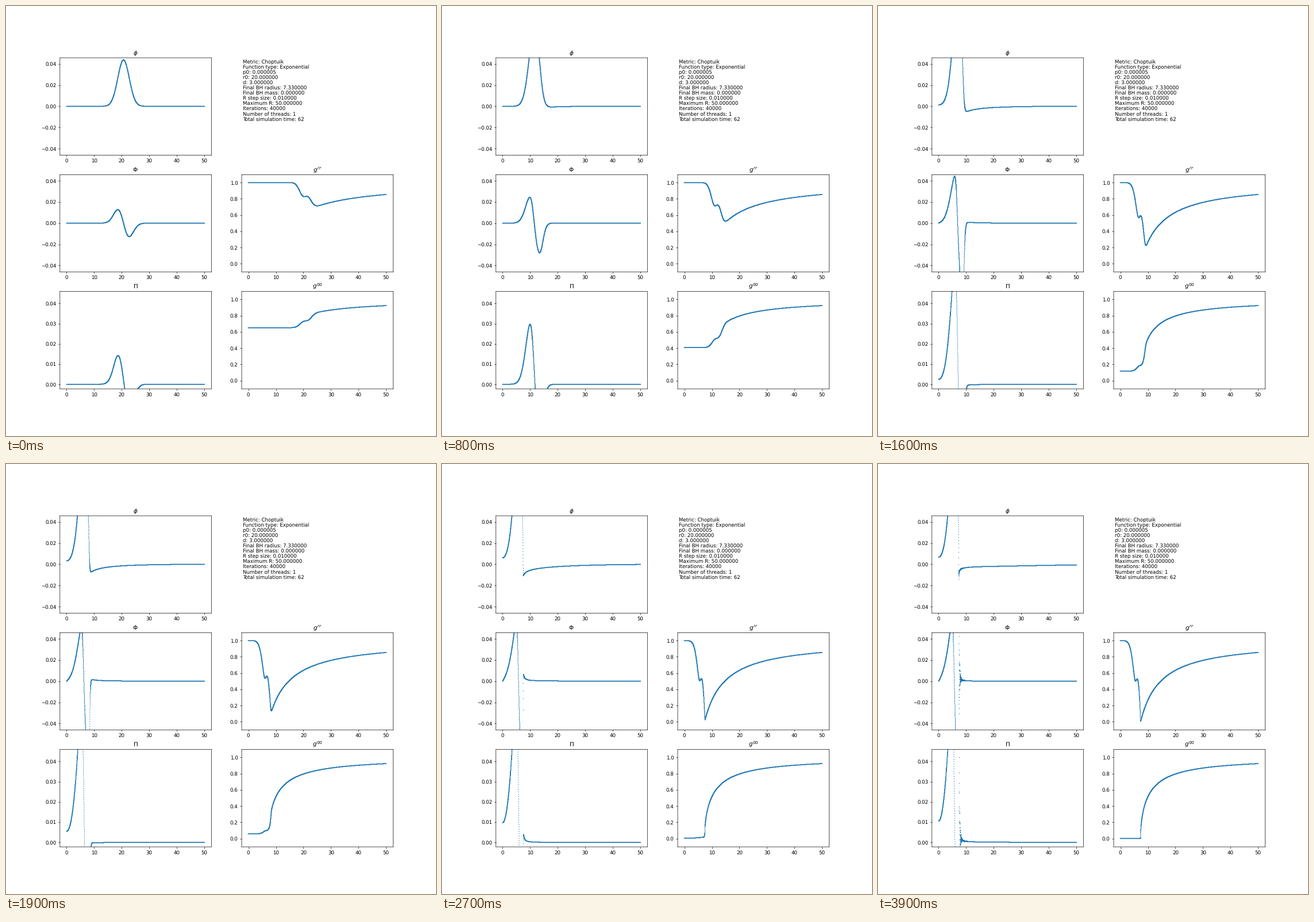
Animation of 748 by 748 pixels, one loop 4000 ms. Source, as a matplotlib script:

```python
import numpy as np
import matplotlib.pyplot as plt
from matplotlib import patheffects
from matplotlib.animation import FuncAnimation

# Spherical collapse of a massless scalar field in polar-areal slicing:
# Phi = phi', Pi = (a / alpha) dphi/dt, evolved with RK4.

SIZE, INCHES = 748, 12
DPI = SIZE / INCHES
GRID = 100 / DPI                 # points sit on a 100 dpi grid
FRAMES, INTERVAL = 40, 100
STEPS = 125                      # time steps per frame
DT = 2 / STEPS
R_MAX, DR = 50, 0.01
R0, WIDTH, HORIZON = 20, 3, 7.326

plt.rcParams["font.family"] = "DejaVu Sans"
plt.rcParams["text.hinting"] = "none"
plt.rcParams["path.simplify"] = False

r = np.linspace(0, R_MAX, 5001)
r2 = r ** 2
r3 = r ** 3
shell = 3 / (r3[2:] - r3[:-2])


def geometry(Phi, Pi):
    """Solve the constraints: light speed alpha/a and the product alpha*a."""
    q = 4 * np.pi * r * (Phi * Phi + Pi * Pi)
    Q = DR * (np.cumsum(q) - q / 2)
    prod = np.exp(Q - Q[-1])
    speed = DR * (np.cumsum(prod) - (prod + prod[0]) / 2)
    speed[1:] /= r[1:]
    speed[0] = prod[0]
    return speed, prod


def pulse(p):
    """Ingoing pulse phi = p r^3 exp(-((r - r0) / d)^2)."""
    g = p * np.exp(-((r - R0) / WIDTH) ** 2)
    Phi = g * (3 * r2 - 2 * (r - R0) / WIDTH ** 2 * r3)
    return np.array([g * r3, Phi, Phi + g * r2])


def tuned_pulse():
    """Find the amplitude whose total mass gives the wanted horizon."""
    lo, hi = 4.5e-6, 6e-6
    for _ in range(30):
        mid = (lo + hi) / 2
        state = pulse(mid)
        speed, _prod = geometry(*state[1:])
        if R_MAX * (1 - speed[-1]) < HORIZON:
            lo = mid
        else:
            hi = mid
    return state


def rate(state):
    _, Phi, Pi = state
    c, _prod = geometry(Phi, Pi)
    G = c * Pi
    F = r2 * c * Phi
    out = np.empty_like(state)
    out[0] = G
    out[1, 0] = 0
    out[1, 1:-1] = (G[2:] - G[:-2]) / (2 * DR)
    out[2, 0] = 3 * c[1] * Phi[1] / DR
    out[2, 1:-1] = (F[2:] - F[:-2]) * shell
    # outgoing waves leave through the outer edge
    edge, inner = state[1:, -1], state[1:, -2]
    out[1:, -1] = -c[-1] * ((edge - inner) / DR + edge / R_MAX)
    return out


def rk4(state):
    k1 = rate(state)
    k2 = rate(state + DT / 2 * k1)
    k3 = rate(state + DT / 2 * k2)
    k4 = rate(state + DT * k3)
    return state + DT / 6 * (k1 + 2 * (k2 + k3) + k4)


def curves(state):
    phi, Phi, Pi = state
    speed, prod = geometry(Phi, Pi)
    g_rr = speed / prod
    return phi, Phi, Pi, g_rr, np.sqrt(g_rr) * prod


def simulate():
    state = tuned_pulse()
    history = [curves(state)]
    for _ in range(FRAMES - 1):
        for _ in range(STEPS):
            state = rk4(state)
        history.append(curves(state))
    return history


class Trace:
    """Point plot: a solid stroke where points are dense, dots elsewhere."""

    def __init__(self, ax):
        style = dict(color="tab:blue", solid_capstyle="round", snap=False)
        self.solid, = ax.plot([], [], lw=1.75 * 72 / DPI, **style)
        self.dots, = ax.plot([], [], lw=1.45 * 72 / DPI, **style)
        self.ax = ax

    def draw(self, y):
        to_px = self.ax.transData
        pixels = to_px.transform(np.column_stack([r, y]))
        wide = np.abs(np.diff(pixels[:, 1])) > 0.6
        loose = np.append(wide, False) | np.insert(wide, 0, False)
        snapped = np.round(pixels * GRID) / GRID
        x, y = to_px.inverted().transform(snapped).T
        self.solid.set_data(x, np.where(loose, np.nan, y))
        x, y = x[loose], y[loose]
        gap = np.full_like(x, np.nan)
        self.dots.set_data(np.column_stack([x, x + 0.004, gap]).ravel(),
                           np.column_stack([y, y, gap]).ravel())


history = simulate()
top = history[0][0].max()
wave = (-1.05 * top, 1.05 * top)
panels = [
    (1, r"$\phi$", wave),
    (3, r"$\Phi$", wave),
    (5, r"$\Pi$", (-0.05 * top, 1.05 * top)),
    (4, "$g^{rr}$", (-0.1, 1.1)),
    (6, "$g^{00}$", (-0.1, 1.1)),
]

fig = plt.figure(figsize=(INCHES, INCHES), dpi=DPI, facecolor="white")
traces = []
# the box lines run through the middle of a grid cell
half_cell = patheffects.Stroke(offset=(0.36, -0.36))
for cell, title, limits in panels:
    ax = fig.add_subplot(3, 2, cell)
    ax.set_title(title)
    ax.set_xlim(-2.5, 52.5)
    ax.set_ylim(limits)
    for spine in ax.spines.values():
        spine.set_snap(False)
        spine.set_path_effects([half_cell])
    traces.append(Trace(ax))

info = [
    "Metric: Choptuik",
    "Function type: Exponential",
    "p0: 0.000005",
    "r0: 20.000000",
    "d: 3.000000",
    "Final BH radius: 7.330000",
    "Final BH mass: 0.000000",
    "R step size: 0.010000",
    "Maximum R: 50.000000",
    "Iterations: 40000",
    "Number of threads: 1",
    "Total simulation time: 62",
]
for i, line in enumerate(info):
    fig.text(412 / SIZE, 1 - (99.7 + 9.07 * i) / SIZE, line, va="baseline")


def update(k):
    for trace, y in zip(traces, history[k]):
        trace.draw(y)
    return [line for t in traces for line in (t.solid, t.dots)]


anim = FuncAnimation(fig, update, frames=FRAMES, interval=INTERVAL,
                     repeat=True, repeat_delay=0, blit=False)
plt.show()
```
